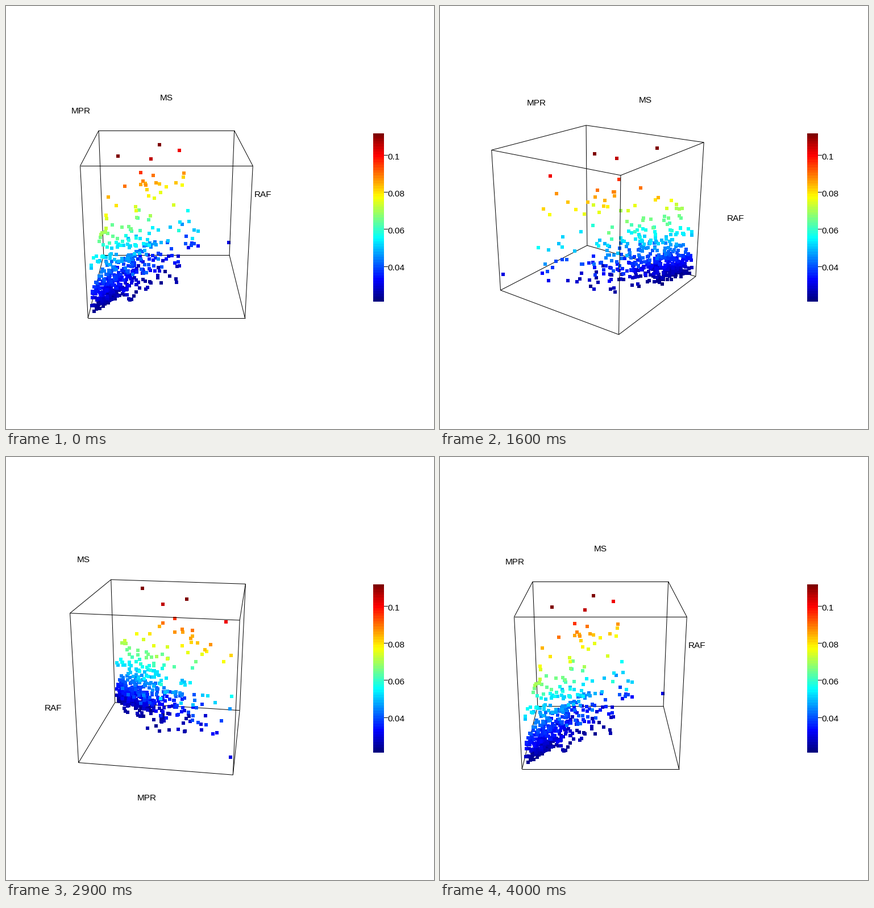
These frames come from a looping animation (753 px wide and 744 px high, 4.05 s). A matplotlib script:

```python
from itertools import combinations, product

import matplotlib.pyplot as plt
import numpy as np
from matplotlib.animation import FuncAnimation
from matplotlib.collections import LineCollection
from matplotlib.colors import LinearSegmentedColormap

W, H, DPI = 753, 744, 100
FRAMES, INTERVAL = 81, 50
CX, CY, SCALE = 282.4, 372, 256
TILT, PERSPECTIVE = np.radians(20), 0.245
Z_MAX = 0.487
PX = 72 / DPI

JET = LinearSegmentedColormap.from_list("jet9", [
    "#00007F", "#0000FF", "#007FFF", "#00FFFF", "#7FFF7F",
    "#FFFF00", "#FF7F00", "#FF0000", "#7F0000"], N=64)

# The few points that stand apart: the peak and the far corner
EXTREMES = [(-.303, -.22, .487), (-.046, .128, .480), (.095, .40, .374),
            (-.101, -.04, .424), (-.173, .031, .311), (.487, .48, -.383)]


def height(t):
    return (2 * t - 1) * Z_MAX


def main_cloud(rng, count):
    """Skewed cloud that fans out from the low corner of the box."""
    n = count * 2
    t = 0.012 + rng.gamma(1.2, 0.19, n)
    s = rng.gamma(1.8, 1 / 1.8, n)
    x = -0.48 + 0.18 * (1 + t) * s * np.exp(0.3 * rng.normal(size=n))
    y = -0.485 + 0.25 * (1 + 1.6 * t) * s * np.exp(0.25 * rng.normal(size=n))
    keep = (t < 0.6) & (x < 0.1) & (y < 0.33)
    return np.column_stack([x, y, height(t)])[keep][:count]


def high_tail(rng, count):
    """Yellow to orange points, spread along the diagonal."""
    u, v = rng.normal(size=(2, count)).clip(-1.7, 1.7)
    t = np.linspace(0.58, 0.76, count)
    return np.column_stack([-0.13 + 0.15 * u, 0.09 + 0.18 * u + 0.06 * v,
                            height(t)])


def far_tail(rng, count):
    """Blue points scattered far out over the floor."""
    x = rng.normal(0.17, 0.04, count)
    y = rng.uniform(-0.05, 0.47, count)
    return np.column_stack([x, y, rng.uniform(-0.46, -0.1, count)])


def project(points, angle):
    """Turn about the vertical axis, tilt, and return pixels and depth."""
    x, y, z = np.asarray(points, float).T
    c, s = np.cos(angle), np.sin(angle)
    right, back = x * c - y * s, x * s + y * c
    depth = z * np.sin(TILT) - back * np.cos(TILT)
    up = z * np.cos(TILT) + back * np.sin(TILT)
    k = SCALE / (1 - PERSPECTIVE * depth)
    return np.column_stack([CX + right * k, CY - up * k]), depth


def label_spots(angle):
    """Anchor points of the MS, MPR and RAF labels on the outer edges."""
    a = angle - 1e-4
    sx = -1 if np.sin(a) > 0 else 1
    sy = 1 if np.cos(a) > 0 else -1
    if abs(np.sin(a)) > np.sqrt(0.5):
        mpr = (0.75 * sx, 0, -0.55)
    else:
        mpr = (-0.55 * sx, 0, 0.74)
    return [(0, 0.55 * sy, 0.74), mpr, (0.75 * sx, 0.55 * sy, 0)]


rng = np.random.default_rng(7)
cloud = np.vstack([main_cloud(rng, 450), high_tail(rng, 22),
                   far_tail(rng, 14), EXTREMES])
colors = JET((cloud[:, 2] / Z_MAX + 1) / 2)
corners = np.array(list(product((-0.5, 0.5), repeat=3)))
edges = [(i, j) for i, j in combinations(range(8), 2)
         if np.sum(corners[i] != corners[j]) == 1]

fig = plt.figure(figsize=(W / DPI, H / DPI), dpi=DPI, facecolor="white")
ax = fig.add_axes([0, 0, 1, 1])
ax.axis("off")

FONT = dict(family="Liberation Sans", size=15.4 * PX, color="black",
            va="baseline")

# Colour key
ax.imshow(np.linspace(1, 0, 64)[:, None], cmap=JET, aspect="auto",
          interpolation="nearest", extent=(646, 665, 520, 224))
for i, text in enumerate(["0.1", "0.08", "0.06", "0.04"]):
    tick = 262 + 65.2 * i
    ax.plot([665, 671], [tick, tick], color="black", lw=PX)
    ax.text(671, tick + 7.5, text, ha="left", **FONT)

ax.set_xlim(0, W)
ax.set_ylim(H, 0)

line_style = dict(colors="black", linewidths=PX)
back_box = ax.add_collection(LineCollection([], zorder=2, **line_style))
dots = ax.scatter(cloud[:, 0], cloud[:, 1], s=(6 * PX) ** 2, marker="s",
                  linewidths=0, antialiased=False, zorder=3)
front_box = ax.add_collection(LineCollection([], zorder=4, **line_style))
labels = [ax.text(0, 0, name, ha="center", zorder=5, **FONT)
          for name in ("MS", "MPR", "RAF")]


def update(frame):
    angle = 2 * np.pi * frame / (FRAMES - 1)

    pos, depth = project(cloud, angle)
    order = np.argsort(depth)
    dots.set_offsets(pos[order])
    dots.set_facecolors(colors[order])

    pos, depth = project(corners, angle)
    far = np.argmin(depth)
    back_box.set_segments([pos[list(e)] for e in edges if far in e])
    front_box.set_segments([pos[list(e)] for e in edges if far not in e])

    pos, _ = project(label_spots(angle), angle)
    for label, (x, y) in zip(labels, pos):
        label.set_position((x - 0.5, y + 6.5))
    return [back_box, dots, front_box, *labels]


anim = FuncAnimation(fig, update, frames=FRAMES, interval=INTERVAL,
                     repeat=True, repeat_delay=0)
plt.show()
```
